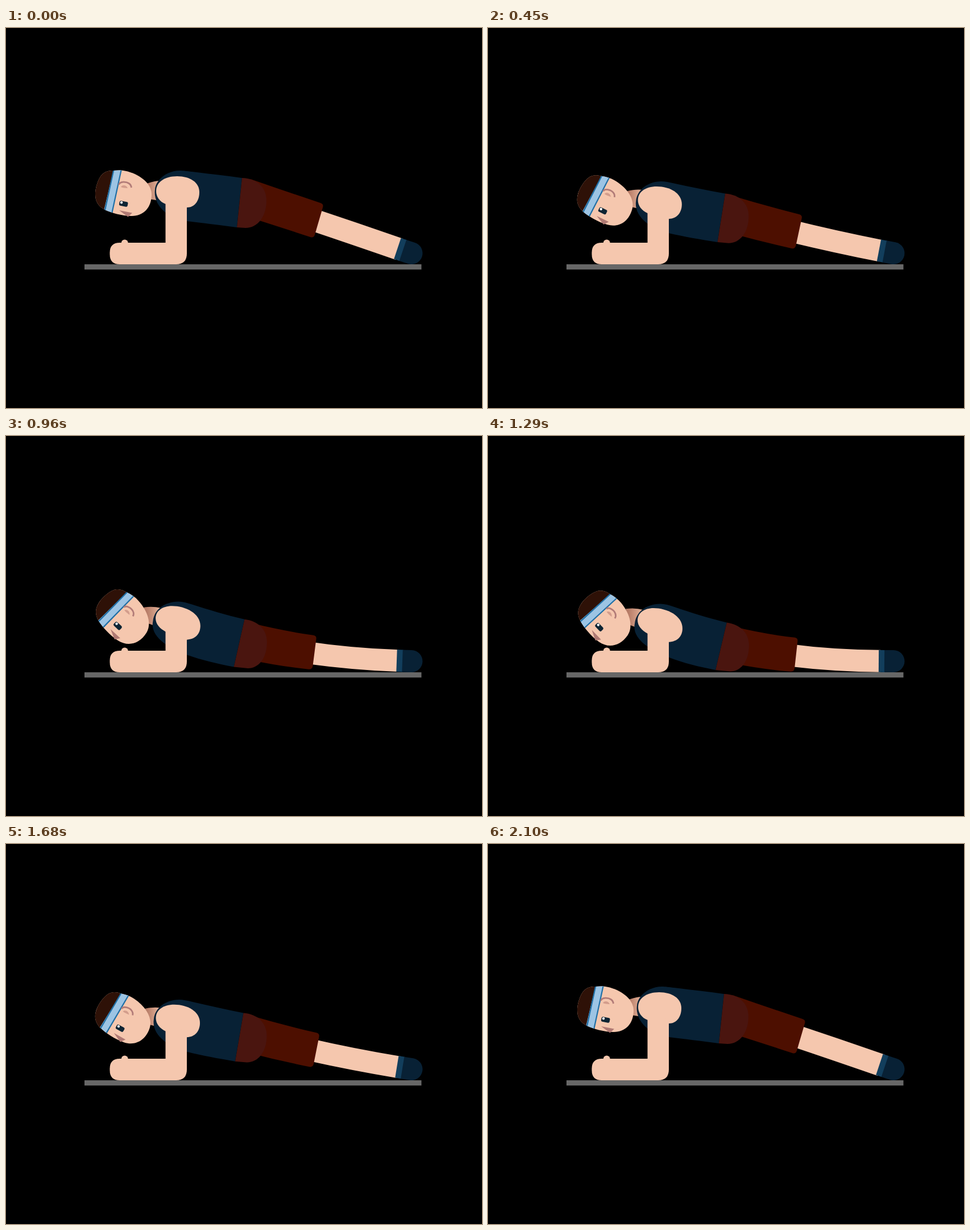
Recreate the animation shown at these times as an HTML page. Size 837 by 669 pixels, loop 3120 ms.

```html
<!DOCTYPE html>
<html lang="en">
<head>
<meta charset="utf-8">
<title>Plank</title>
<style>
  html, body { margin: 0; width: 100%; height: 100%; overflow: hidden; background: #000; }
  svg { display: block; width: 100%; height: 100%; }
  .skin { fill: #f5c7ae; }
  .navy { fill: #082135; }
</style>
</head>
<body>
<svg viewBox="0 0 837 669">
  <defs>
    <linearGradient id="neckShade">
      <stop offset=".15" stop-color="#b67b66"/>
      <stop offset="1" stop-color="#e6b59c"/>
    </linearGradient>
    <path id="skull" d="M189 251C197 250 206 250 214 252.500C240 260 256 276 256 293C256 316 242 331 221 331C204 331 184 325 174 320C162 314 157 305 157 293C157 280 163 262 171 256C176 252 182 251 189 251Z"/>
    <clipPath id="skullClip"><use href="#skull"/></clipPath>
  </defs>

  <path id="neck" fill="url(#neckShade)"/>
  <path id="leg" class="skin"/>
  <g id="foot">
    <path fill="#123e5c" d="M-26 -19.500H-15V19.500H-26Z"/>
    <path class="navy" d="M-16 -19.500H0A19.500 19.500 0 0 1 0 19.500H-16Z"/>
  </g>
  <path id="shorts" fill="#4d0f00"/>
  <path id="torso" class="navy"/>
  <path id="hip" fill="#4a150f"/>

  <g id="head">
    <use href="#skull" class="skin"/>
    <g clip-path="url(#skullClip)">
      <path fill="#2e1107" d="M150 240H191.500L172 330H150Z"/>
      <path fill="#9cc4e4" d="M191.500 240H205L184.500 334L170 330Z"/>
      <path fill="none" stroke="#1f6fa6" stroke-width="2.200" d="M191.500 240L172 330M204.800 240L184.500 334"/>
    </g>
    <path fill="none" stroke="#b27c78" stroke-width="2.800" d="M198.500 276C200 270 211 270 216 273.500Q220 276 220.500 281"/>
    <path fill="#d39d8c" d="M202 280C204 275.500 212 276 214 282C209 281.500 206 281.500 202 280Z"/>
    <g transform="translate(206.700 309.500) rotate(11)">
      <rect x="-7.500" y="-4.300" width="15" height="8.600" rx="2.500" fill="#0d2433"/>
      <circle cx="-4" cy="-1.500" r="2.200" fill="#fff"/>
    </g>
    <path fill="#b07a74" d="M199 321L222 325.500L214.500 332.500Z"/>
  </g>

  <path id="shoulder" class="skin"/>
  <path id="upperArm" class="skin"/>
  <path class="skin" d="M200 378H318V397Q318 416 299 416H200Q182.500 416 182.500 398.500V395.500Q182.500 378 200 378Z"/>
  <circle class="skin" cx="208.700" cy="378.500" r="6"/>
  <rect x="138" y="416" width="592.500" height="9.200" fill="#676767"/>
</svg>
<script>
const LOOP = 3120, TICK = 30;

// Each shape: raised pose, lowered pose.
const shapes = {
  neck: [
    "M244 275Q257 270 268 269L270 304L250 301Z",
    "M242 305Q258 303 273 307L264 339L248 333Z"],
  torso: [
    "M262 284C264 266 284 251 306 251C311 251 319 252 327 253C356 256.500 386 260 415 264L406 351C375 347 345 343 318 340C285 336 258 312 262 284Z",
    "M258 331C260 312 276 297 303 296.500C311 296.500 319 299 327 302C356 312 386 322 420 330L400 413.500C372 408 343 401 318 391C285 378 252 358 258 331Z"],
  hip: [
    "M415 264C442 265 458 281 458 304C458 331 443 352 421 352L406 351Z",
    "M420 330C443 333 459 348 459 370C459 399 444 416 426 416L400 413.500Z"],
  shorts: [
    "M430 266Q490 287 553 308Q559 310 557 316L543 364Q541 370 535 368Q480 350 430 334Z",
    "M430 337Q490 351 539 356Q545 357 544 363L539 410Q538 416 532 416Q480 412 430 402Z"],
  leg: [
    "M540 317Q618 343 697 370.500L685 408Q610 382 530 355Z",
    "M530 367.500Q605 377 690 377L690 416Q610 416 526 406.500Z"],
  shoulder: [
    "M281 310C270 306 264 297 264 287C264 272 278 261 301 261C324 261 340 272 340 289C340 305 331 316 318 316Z",
    "M281 349C270 343 263 335 263 325C263 313 274 304 291 304C314 304 342 317 342 340C342 354 333 363 318 364Z"],
  upperArm: [
    "M280.500 309L300 290L318 315V380H280.500Z",
    "M280.500 348L300 340L318 363V380H280.500Z"]
};

const el = id => document.getElementById(id);
const mix = (a, b, p) => a + (b - a) * p;
const numbers = /-?\d+(\.\d+)?/g;

function morph([a, b], p) {
  const ends = b.match(numbers);
  let i = 0;
  return a.replace(numbers, n => mix(+n, +ends[i++], p).toFixed(2));
}

function lowering(t) {
  if (t < 1270) return Math.min(t / 1080, 1);
  return Math.max(1 - (t - 1270) / 830, 0);
}

function draw(now) {
  const t = Math.floor((now % LOOP) / TICK) * TICK;
  const p = lowering(t);
  for (const id in shapes) el(id).setAttribute("d", morph(shapes[id], p));
  el("foot").setAttribute("transform", `translate(713 396.500) rotate(${mix(18.5, 0, p)})`);
  el("head").setAttribute("transform",
    `translate(${mix(0, -0.5, p)} ${mix(0, 31, p)}) rotate(${36 * p} 206.500 291)`);
}

const start = performance.now();
function frame() {
  draw(performance.now() - start);
  requestAnimationFrame(frame);
}
frame();
</script>
</body>
</html>
```
